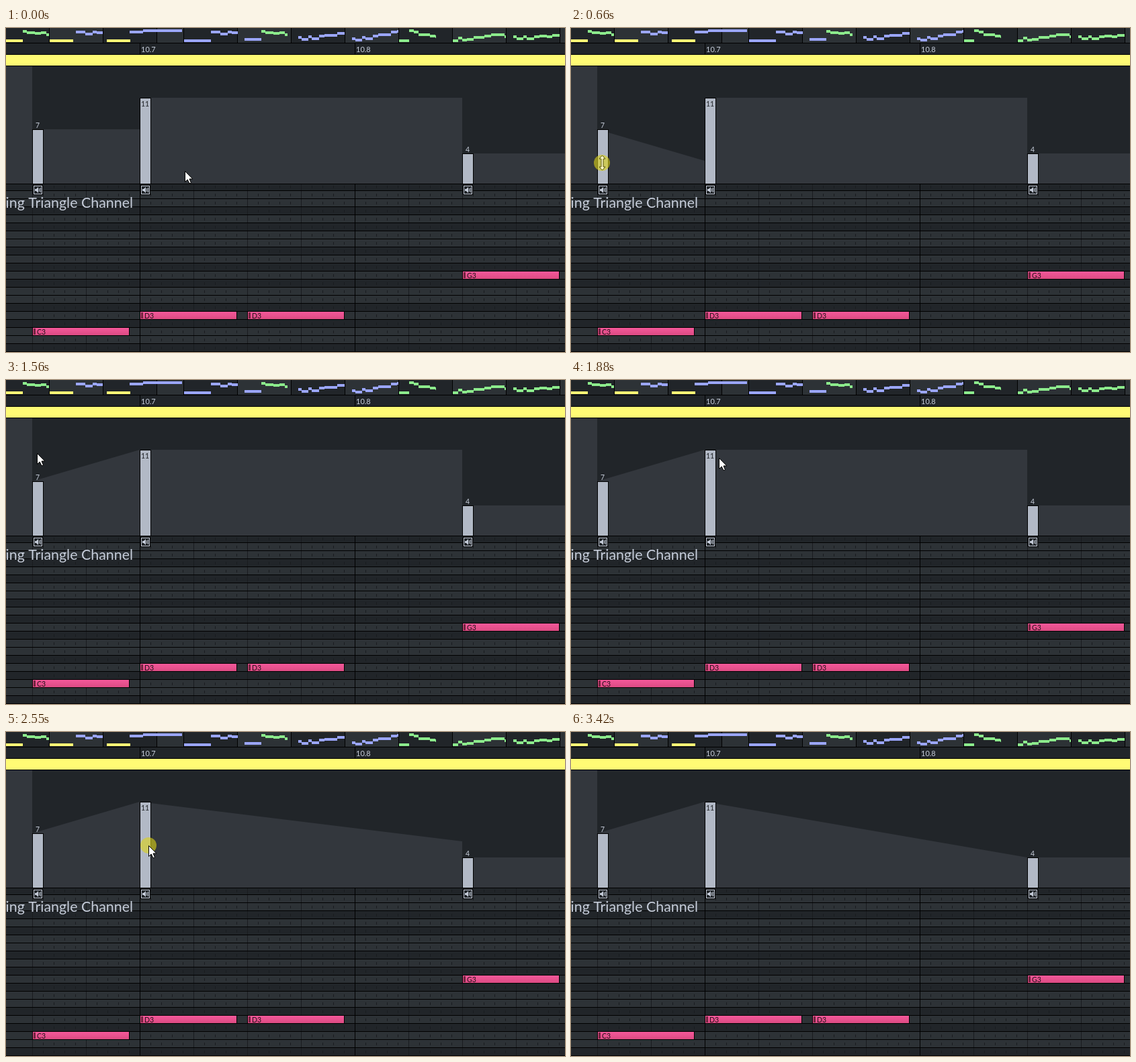
Animation of 832 by 483 pixels, one loop 4.08 s. Source, as an HTML page with a canvas:

```html
<!DOCTYPE html>
<html>
<head>
<meta charset="utf-8">
<title>Volume slides</title>
<style>
  html, body { margin: 0; width: 100%; height: 100%; overflow: hidden; background: #212529; }
  canvas { display: block; }
</style>
</head>
<body>
<canvas id="stage" width="832" height="483"></canvas>
<script>
const ctx = document.getElementById('stage').getContext('2d');
const LOOP = 4080, W = 832, H = 483, FLOOR = 232;
const FIRST_STEP = 100, STEP = 110.6;
const ZERO = 233.8, UNIT = 11.8;        // volume scale
const DARK = '#212529', LIT = '#2d3236', FILL = '#33373d', LINE = '#191c1f';
const BAR = '#b2b9c6', TEXT = '#c6cdda', YELLOW = '#fffb75', BLUE = '#9ba6ff', GREEN = '#8ceb8c';

// Pointer path: step, x, y
const path = [
  [-1, 266, 213], [1, 150, 116], [3, 47, 150], [5, 46, 201], [6, 44, 219], [9, 44, 117],
  [11, 46, 109], [13, 46, 109], [15, 205, 108], [16, 220, 116], [17, 220, 116],
  [20, 212, 130], [22, 212, 169], [26, 212, 185], [28, 212, 185], [29, 246, 205]
];
const GONE = 30;
const volumes = [
  { x: 40, value: 7, drag: [5, 12] },
  { x: 200, value: 11, drag: [21, 27] },
  { x: 680, value: 4 }
];
const notes = [[40, 447, 'C3'], [200, 423, 'D3'], [360, 423, 'D3'], [680, 363, 'G3']];

function rect(color, x, y, w, h) {
  ctx.fillStyle = color;
  ctx.fillRect(x, y, w, h);
}

function poly(points, fill, stroke) {
  ctx.beginPath();
  points.forEach(([x, y]) => ctx.lineTo(x, y));
  ctx.closePath();
  ctx.fillStyle = fill;
  ctx.fill();
  if (!stroke) return;
  ctx.strokeStyle = stroke;
  ctx.lineWidth = 1;
  ctx.stroke();
}

function label(text, x, y, size, color = TEXT, align = 'left') {
  ctx.font = `${size}px Lato, sans-serif`;
  ctx.textAlign = align;
  ctx.fillStyle = color;
  ctx.fillText(text, x, y);
}

const levelY = value => Math.min(FLOOR, Math.round(ZERO - value * UNIT));
const levelAt = y => Math.max(0, Math.min(11, Math.ceil((ZERO - y) / UNIT - .2)));

// A short melody drifting between two heights, or one flat bar if they are equal.
function phrase(color, x, width, from, to) {
  if (from === to) return rect(color, x, from, width, 4);
  let seed = width;
  const random = () => (seed = seed * 16807 % 2147483647) / 2147483647;
  random();
  for (let dx = 0; dx < width;) {
    const w = Math.min(5 + Math.floor(random() * 8), width - dx);
    const y = from + (to - from) * dx / width + (random() - .5) * 5;
    rect(color, x + dx, Math.round(y), w, 4);
    dx += w;
  }
}

function drawOverview() {
  rect(DARK, 0, 0, W, 56);
  for (let i = 0; i < 11; i++) {
    const x = i < 3 ? 64 + i * 80 : 24 + i * 80;
    if (i % 2 === 0) rect(LIT, x, 0, i === 2 ? 40 : 80, 22);
    rect('#000', x, 0, 1, 22);
  }
  for (const x of [-10, 65, 150]) phrase(YELLOW, x, 35, 17, 17);
  for (const x of [25, 380]) phrase(GREEN, x, 39, 3, 6);
  for (const x of [104, 305]) phrase(BLUE, x, 40, 5, 6);
  phrase(BLUE, 184, 20, 4, 4);
  phrase(BLUE, 204, 58, 2, 2);
  phrase(BLUE, 265, 40, 17, 17);
  phrase(BLUE, 355, 25, 15, 15);
  phrase(BLUE, 435, 69, 14, 6);
  phrase(BLUE, 515, 69, 16, 3);
  phrase(GREEN, 585, 15, 17, 17);
  phrase(GREEN, 600, 40, 3, 13);
  phrase(GREEN, 665, 79, 16, 8);
  phrase(GREEN, 755, 69, 13, 9);
  rect('#000', 0, 22, W, 1);
  ['10.7', '10.8'].forEach((text, i) => {
    const x = 199 + i * 320;
    rect('#000', x, 23, 1, 17);
    label(text, x + 2, 36, 11);
  });
  rect('#000', 0, 39, W, 18);
  rect(YELLOW, 0, 40, W, 16);
}

function drawRoll() {
  const blackKeys = [0, 3, 5, 8, 10];
  for (let i = 0, y = 231; y < H; i++, y += 12) rect(blackKeys.includes(i % 12) ? DARK : LIT, 0, y, W, 11);
  for (let i = 0, x = 39; x < W; i++, x += 16) {
    const beat = i % 20 === 10;
    if (i % 5 === 0) rect(beat ? '#000' : LINE, x, 233, 1, H - 233);
    else for (let y = 235; y < H; y += 12) rect(LINE, x, y, 1, 4);
  }
  for (let y = 242; y < H; y += 12) rect('#000', 0, y, W, 1);
  label('ing Triangle Channel', 189, 268, 21.4, TEXT, 'right');
  for (const [x, y, name] of notes) {
    rect('#000', x - 1, y - 1, 145, 13);
    const shade = ctx.createLinearGradient(0, y, 0, y + 11);
    shade.addColorStop(0, '#f4589a');
    shade.addColorStop(1, '#dc4b83');
    rect(shade, x, y, 143, 11);
    rect('#72243f', x + 1, y + 1, 3, 9);
    label(name, x + 6, y + 10, 10.5, '#24101a');
  }
}

function drawSpeaker(x) {
  rect('#000', x, 234, 15, 15);
  rect(TEXT, x + 1, 235, 13, 13);
  rect(DARK, x + 2, 236, 11, 11);
  poly([[x + 3, 240], [x + 5, 240], [x + 8, 237], [x + 8, 246], [x + 5, 243], [x + 3, 243]], TEXT);
  rect(TEXT, x + 9, 239, 1, 5);
  rect(TEXT, x + 11, 238, 1, 7);
}

function drawVolumes(step, pointer) {
  rect(DARK, 0, 57, W, 175);
  rect(FILL, 0, 57, 39, 175);
  volumes.forEach(({ x, value, drag }, i) => {
    const left = x - 1, right = i < 2 ? volumes[i + 1].x - 1 : W;
    const sliding = drag && step >= drag[0];
    const end = sliding ? levelAt(pointerAt(Math.min(step, drag[1])).y) : value;
    poly([[left, FLOOR], [left, levelY(value)], [right, levelY(end)], [right, FLOOR]], FILL);
  });
  rect('#000', 0, FLOOR, W, 1);
  for (const volume of volumes) {
    const { x, value } = volume, top = levelY(value), inside = value > 8;
    const hovered = pointer.over === volume && !pointer.dragging;
    rect(hovered ? '#fff' : '#000', x - 1, top, 17, FLOOR + 1 - top);
    rect(BAR, x, top + 1, 15, FLOOR - top - 1);
    label(value, x + 7, top + (inside ? 13 : -2), 10.5, inside ? DARK : TEXT, 'center');
    drawSpeaker(x);
  }
}

function pointerAt(step) {
  const i = Math.max(1, path.findIndex(([s]) => s >= step));
  const [s0, x0, y0] = path[i - 1], [s1, x1, y1] = path[i];
  const part = (step - s0) / (s1 - s0);
  const x = Math.round(x0 + (x1 - x0) * part), y = Math.round(y0 + (y1 - y0) * part);
  return {
    x, y,
    over: volumes.find(v => x >= v.x && x < v.x + 16 && y > levelY(v.value)),
    dragging: volumes.some(({ drag }) => drag && step >= drag[0] && step <= drag[1])
  };
}

function drawPointer({ x, y, over, dragging }) {
  if (dragging) {
    ctx.beginPath();
    ctx.arc(x, y, 12, 0, 7);
    ctx.fillStyle = 'rgba(222,212,20,.6)';
    ctx.fill();
  }
  const resize = over === volumes[0];
  const shape = resize
    ? [[.5, -11], [5, -6], [2, -6], [2, 6], [5, 6], [.5, 11], [-4, 6], [-1, 6], [-1, -6], [-4, -6]]
    : [[.5, .5], [.5, 16.5], [4.2, 13], [7, 18.8], [9.5, 17.8], [7, 12], [11.8, 12]];
  poly(shape.map(([dx, dy]) => [x + dx, y + dy]), resize ? '#fffbc4' : '#fff', resize ? '#55520f' : '#000');
}

function draw(now) {
  const step = Math.floor((now % LOOP - FIRST_STEP) / STEP);
  const pointer = step < GONE ? pointerAt(step) : {};
  drawOverview();
  drawRoll();
  drawVolumes(step, pointer);
  if (step < GONE) drawPointer(pointer);
}

const start = performance.now();
function tick() {
  draw(performance.now() - start);
  requestAnimationFrame(tick);
}
tick();
</script>
</body>
</html>
```
